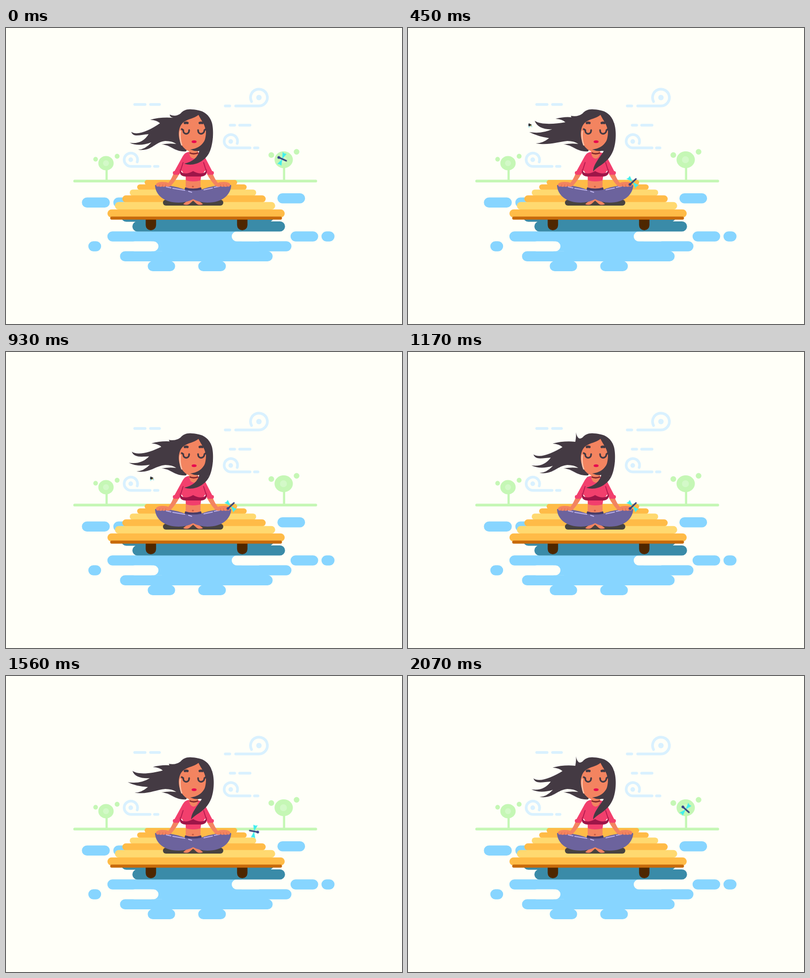
Recreate the animation shown at these times as an HTML page. Size 800 by 600 pixels, loop 2.1 s.

```html
<!DOCTYPE html>
<html lang="en">
<head>
<meta charset="utf-8">
<title>Calm on the pier</title>
<style>
  html, body { margin: 0; width: 100%; height: 100%; overflow: hidden; background: #fffff8; }
  svg { display: block; width: 800px; height: 600px; }
  .wind { fill: none; stroke: #d9f1ff; stroke-width: 5.5; stroke-linecap: round; }
  .dots { fill: #d9f1ff; }
  .tree { fill: #c5f7b5; }
  .water { fill: none; stroke: #87d5ff; stroke-width: 20.4; stroke-linecap: round; }
  .gap { stroke: #fffff8; stroke-width: 20; }
  .shade { stroke: #3a8ba8; }
  .post { stroke: #4e2700; stroke-width: 21; }
  .hair { fill: #443a43; }
  .skin { fill: #f38460; }
  .top { fill: #f23f6d; }
  .line { fill: none; stroke: #443a43; stroke-width: 3.4; stroke-linecap: round; }
  .brow { stroke-width: 5; }
  .shine { fill: none; stroke: #b9afe8; stroke-width: 2.2; stroke-linecap: round; }

  #fly { animation: fly 2.1s linear infinite; }
  #bee { animation: bee 2.1s linear infinite; }
  #curl { animation: lift 525ms step-end infinite; }
  #drape { animation: fall 525ms step-end infinite; }

  @keyframes fly {
    0%    { transform: translate(558px, 265.5px) rotate(-156deg); animation-timing-function: ease-in-out; }
    19%, 55% { transform: translate(454px, 312px) rotate(-223deg); animation-timing-function: ease-in; }
    65.7% { transform: translate(464px, 325px) rotate(-270deg); }
    82.9% { transform: translate(538px, 305px) rotate(-428deg); }
    98.6% { transform: translate(561px, 270.5px) rotate(-498deg); }
    100%  { transform: translate(558px, 265.5px) rotate(-516deg); }
  }
  @keyframes bee {
    0%, 100% { transform: translate(322px, 215px); }
    17%   { transform: translate(234px, 206px); }
    21.4% { transform: translate(246px, 197px); }
    31.4% { transform: translate(286px, 170px); }
    44.3% { transform: translate(294px, 256px); }
    65.7% { transform: translate(426px, 257px); }
    82.9% { transform: translate(382px, 159px); }
  }
  @keyframes lift { 0% { visibility: visible; } 80% { visibility: hidden; } }
  @keyframes fall { 0% { visibility: hidden; } 80% { visibility: visible; } }
</style>
</head>
<body>
<svg viewBox="0 0 800 600">
  <g class="wind">
    <path d="M260 155H281M292 155H310M443 158H452M453 197H462M472 197H493M502 243H509M300 280.500H307"/>
    <path d="M464 158H511A17 17 0 1 0 496 149"/>
    <path id="gust" d="M493 243H454A13.500 13.500 0 1 1 467 234"/>
    <use href="#gust" x="-202" y="37.500"/>
  </g>
  <g class="dots">
    <circle cx="511" cy="141" r="5.500"/><circle cx="454" cy="230" r="4.700"/><circle cx="252" cy="267" r="4.700"/>
  </g>

  <g class="tree">
    <rect x="136" y="307.500" width="492.500" height="5.500" rx="2.500"/>
    <rect x="201" y="285" width="4.500" height="25"/><rect x="559.500" y="280" width="4.500" height="30"/>
    <ellipse cx="202" cy="274" rx="15.500" ry="14.500"/><circle cx="181" cy="266" r="4.700"/><circle cx="224.500" cy="260" r="4.900"/>
    <ellipse cx="561" cy="267" rx="18.500" ry="17"/><circle cx="536" cy="257.500" r="5.700"/><circle cx="587" cy="251" r="5.700"/>
  </g>
  <g fill="#d3f9c8"><circle cx="202" cy="274" r="6"/><circle cx="560.500" cy="267" r="7"/></g>

  <g class="water">
    <path d="M163.500 353.700H199.500M227 353.700H260M558.500 345.200H594"/>
    <path d="M215 422.500H460M585 422.500H620.500M647.500 422.500H653.500"/>
    <path d="M176.500 442.500H182M318 442.500H566.500M240.500 462.700H528.500M296.500 482.700H331.500M398.500 482.700H434"/>
    <path d="M304 422.500H466M304 442.500H330" stroke-linecap="square"/>
    <path class="gap" d="M466 422.500H510M260 442.500H298"/>
    <path class="shade" d="M243 382.500H531M265.500 402.300H553.500"/>
    <path class="post" d="M292.700 380V399.500M477.300 380V399.500"/>
  </g>
  <g id="pier"></g>
  <rect x="210.500" y="382.200" width="347" height="6.200" rx="3" fill="#c76a0b"/>

  <g id="bee">
    <path d="M-3 2L-1 5M3 1L4 4" stroke="#8fdfe8" stroke-width="1.800"/>
    <ellipse rx="3.200" ry="2.300" fill="#20252b"/><circle cx="-1.500" cy="-2.200" r="1.300" fill="#20252b"/>
    <circle cx="1.500" cy="1" r="1" fill="#e8d44a"/>
  </g>

  <path id="mane" class="hair"/>

  <!-- cushion, legs and torso -->
  <rect x="317" y="348" width="122" height="12" rx="6" fill="#48433f"/>
  <g class="skin">
    <path d="M363 298H393V327H363Z"/>
    <path d="M358 357Q365 350 378 345Q390 350 398 357Q391 360 386 357L378 350L370 357Q364 360 358 357Z"/>
  </g>
  <ellipse cx="377.500" cy="321.500" rx="2" ry="1.700" fill="#c95c45"/>
  <path d="M362 323Q378 328 394 323L397 332H359Z" fill="#473c68"/>
  <path fill="#6c639d" d="M301 319C303 315 345 320 362 328Q378 331 394 328C411 320 453 315 455 319C454 338 437 354 407 354Q391 354 378 347Q365 354 349 354C319 354 302 338 301 319Z"/>
  <path class="shine" d="M324 322L333 324M337 325L361 329M369 331L375 333M400 328L417 324.500M421 323L431 321"/>

  <g id="arm">
    <path class="skin" d="M339 294L350 296C345 305 340 312 333 320C328 323 324 321 322 321Q318 323 316 321Q312 323 309 321Q304 323 303 318C303 313 311 312 317 312Q325 312 328 314C332 309 336 302 339 294Z"/>
    <path d="M309 321L311 317M316 321L317 317M322 321L323 317" fill="none" stroke="#d96c4c" stroke-width="1"/>
  </g>
  <use href="#arm" transform="matrix(-1 0 0 1 756 0)"/>

  <path class="skin" d="M370 246H388V270H370Z"/>
  <path class="top" d="M370 251Q361 252 357 260L340 291L350 296L355 289L363 302L364 309Q378 313 393 309L394 302L402 289L407 296L417 291L401 260Q396 253 388 252C388 269 370 269 370 251Z"/>
  <path d="M352 285C352 297 367 297 378 290C389 297 405 297 405 285C408 296 402 301 394 301H363C354 301 349 296 352 285Z" fill="#9e1548"/>
  <path d="M353 288L358 272M404 288L399 272" stroke="#b01a4e" stroke-width="1.700" fill="none"/>
  <g class="top">
    <rect x="337" y="290" width="14" height="7.500" rx="3.700"/><rect x="406" y="290" width="14" height="7.500" rx="3.700"/>
  </g>
  <path d="M371 253Q379 257 388 253" fill="none" stroke="#84282d" stroke-width="3"/>

  <!-- head -->
  <path class="hair" d="M348 215C347 180 358 165 375 165C402 165 418 185 418 222L396 245Z"/>
  <path class="skin" d="M389 176C375 188 351 182 349 213C349 235 361 250 376 251C393 251 405 232 404 206C401 194 394 187 389 176Z"/>
  <path d="M352 209C351 221 352 230 355 237" fill="none" stroke="#fbc3aa" stroke-width="2.600" stroke-linecap="round"/>
  <g class="line">
    <path d="M355 205L358 207C358 217 370 217 370 207M388 207C388 217 400 217 401 207L404 205"/>
    <path class="brow" d="M361.500 192.500Q364 191.500 366.500 192.500M391.500 192.500Q394 191.500 396.500 192.500"/>
  </g>
  <ellipse cx="380" cy="230.500" rx="5" ry="2.800" fill="#e9064f"/>
  <path class="hair" d="M388 174C395 188 401 193 403 206L406 214C403 232 391 245 372 246Q382 251 392 249L411 252C419 235 420 207 416 192C411 176 399 168 388 167Z"/>
  <path id="curl" class="hair" d="M391 247C388 263 377 271 360 275C381 282 403 269 411 252Z"/>
  <path id="drape" class="hair" d="M397 247C389 261 374 276 374 291C382 280 400 276 411 256C421 240 422 207 416 192L405 240Z"/>

  <!-- dragonfly, facing right at zero rotation -->
  <g id="fly">
    <path d="M0 0L-4 -13L1 -12L5 -13.500ZM0 0L-4 13L1 12L5 13.500Z" fill="#3feeee"/>
    <path d="M-9 0H7" stroke="#2b3a78" stroke-width="2.800" stroke-linecap="round"/>
    <circle cx="7.500" r="2.800" fill="#34408a"/>
  </g>
</svg>
<script>
  const GUST = 300; // ms between gusts
  const get = id => document.getElementById(id);

  // Planks grow wider and thicker towards the viewer
  get('pier').innerHTML = Array.from({ length: 6 }, (_, i) => {
    const x = 280 - 15 * i, y = 308 + 8.2 * i + 0.75 * i * i, h = 10 + 1.3 * i;
    const fill = i === 2 || i === 4 ? '#ffd970' : '#ffbb47';
    return `<rect x="${x}" y="${y}" width="${187 + 34.2 * i}" height="${h}" rx="${h / 2}" fill="${fill}"/>`;
  }).join('');

  // Pulse from 0 to 1 that peaks once per gust
  const pulse = (t, peak, sharp) =>
    ((1 + Math.cos(2 * Math.PI * (t - peak) / GUST)) / 2) ** sharp;
  const mix = (a, b, k) => a.map((v, i) => v + (b[i] - v) * k);

  function hairPath(t) {
    const droop = pulse(t, -8, 3), flick = pulse(t, -42, 10);
    const [tx, ty] = mix([329, 178], [341, 160], flick);
    const [sx, sy] = mix([298, 184], [291, 186], droop);
    const [ax, ay] = mix([256, 188], [253, 211], droop);
    const [bx, by] = mix([245, 211], [250, 233], droop);
    const [cx, cy] = mix([258, 234], [267, 247], droop);

    // Roots where neighbouring strands part
    const r1x = sx + 20, r1y = sy + 7;
    const r2x = ax + 35, r2y = 210 + 0.45 * ((ay + by) / 2 - 210);
    const r3x = cx + 27, r3y = 112 + (by + cy) / 4;
    return `M375 165C365 164 358 167 353 173Q343 181 ${tx} ${ty}
      Q${tx + 1} ${ty + 6} 338 182Q${sx + 22} ${sy - 6} ${sx} ${sy}
      Q${sx + 14} ${sy + 1} ${r1x} ${r1y}
      C${r1x - 20} ${(r1y + ay) / 2 + 5} ${ax + 12} ${ay + 9} ${ax} ${ay}
      C${ax + 4} ${ay + 12} ${ax + 18} ${r2y + 1} ${r2x} ${r2y}
      Q${bx + 25} ${by + 4} ${bx} ${by}
      Q${bx + 18} ${by + 9} ${r3x} ${r3y}
      Q${cx + 14} ${cy} ${cx} ${cy}
      C${cx + 28} ${cy + 4} 300 231 322 229Q336 229 344 235
      Q330 233 314 236C335 237 340 252 364 250L385 200Z`;
  }

  let start;
  function draw(now) {
    start ??= now;
    get('mane').setAttribute('d', hairPath(now - start));
    requestAnimationFrame(draw);
  }
  requestAnimationFrame(draw);
</script>
</body>
</html>
```
